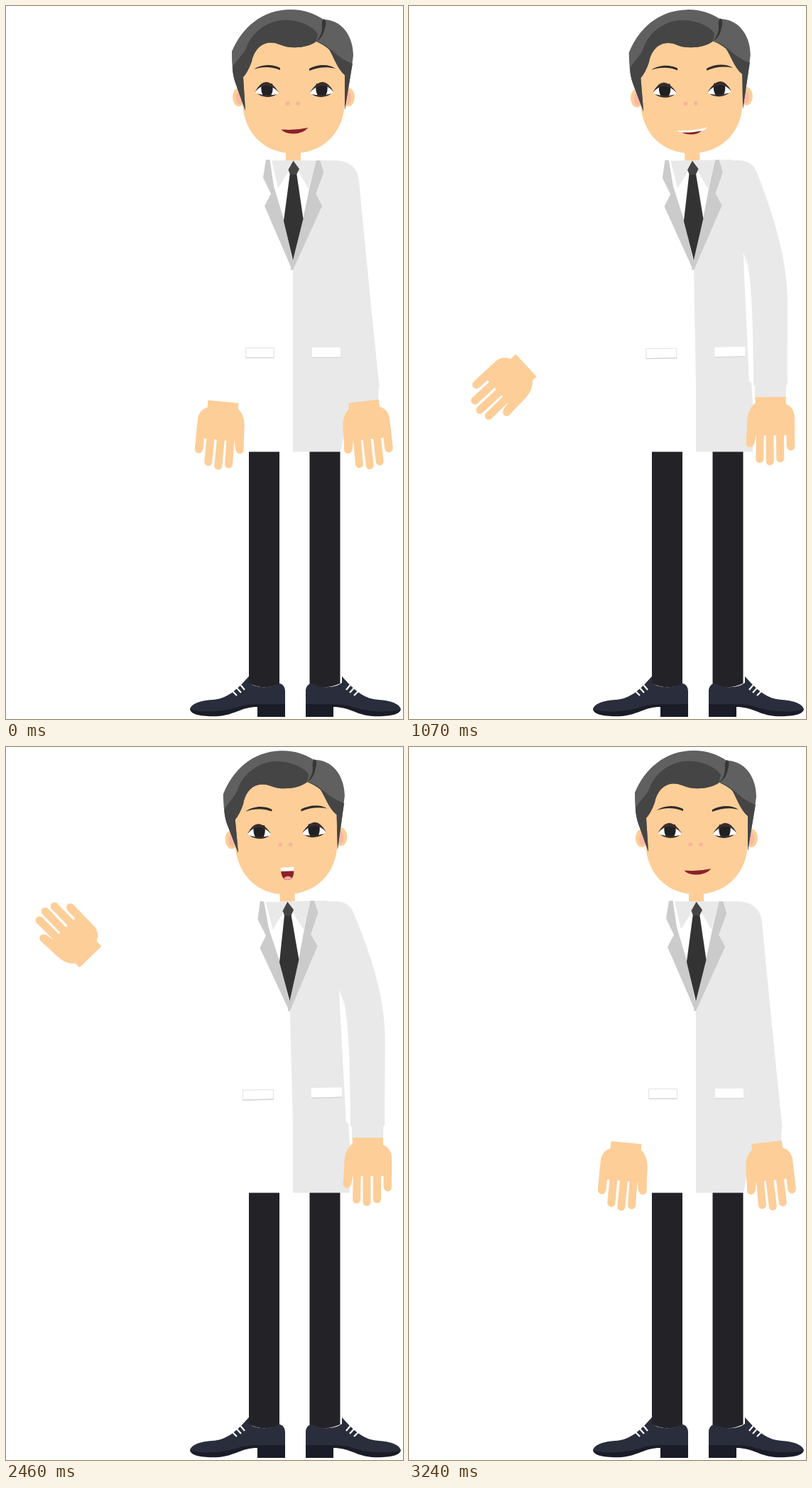
An HTML page for the animation above (3320 ms loop, 559x1002 px).

```html
<!DOCTYPE html>
<html lang="en">
<head>
<meta charset="utf-8">
<title>Doctor presenting</title>
<style>
  html, body { margin: 0; width: 100%; height: 100%; overflow: hidden; background: #fff; }
  svg { display: block; width: 100vw; height: 100vh; }
</style>
</head>
<body>
<svg viewBox="0 0 559 1002" preserveAspectRatio="none">
  <defs>
    <g id="shoe">
      <path fill="#1a1c27" d="M259 988C260 996 275 999 300 998C322 996 332 985 354 985V999H393V975H300Z"/>
      <path fill="#2a2d3b" d="M342 942C326 960 312 974 290 975C275 976 260 980 259 989C285 994 310 991 330 984C344 980 354 982 393 981V963C393 957 390 953 385 952C370 960 350 958 342 951Z"/>
      <path stroke="#fff" stroke-width="2.2" d="M316 960L325 969M321 954L331 965M326 949L336 961"/>
    </g>
    <g id="hand" fill="#fdce98" stroke="#fdce98">
      <path stroke="none" d="M-21.5 0H21.5V8C29 14 32 22 33 32L34.5 64L23.5 66L21 54H-22V70H-33.5V26C-32 17 -28 13 -21.5 10Z"/>
      <path stroke-width="11" stroke-linecap="round" d="M-28 36V70M-13 45V86.500M1.500 45V90.500M15 45L16 87M27 40L29.500 65"/>
    </g>
    <g id="eye">
      <path fill="#fff" d="M-16.500 4Q-2 -24 16.500 5Q10 10 0 10Q-10 10 -16.500 4Z"/>
      <path fill="#212124" d="M-7.500 -8H7.500C9 -2 8 6 5 9H-5C-8 6 -9 -2 -7.500 -8Z"/>
      <path fill="#3a2d2a" d="M-17 4Q-2 -25 17 5Q-1 -15 -17 4ZM-14 6Q0 10 14 7Q8 11 0 11Q-9 10 -14 6Z"/>
    </g>
  </defs>

  <path fill="#232227" d="M342 620H385V953Q364 962 342 952ZM427.500 620H470.500V952Q449 962 427.500 953Z"/>
  <use href="#shoe"/>
  <use href="#shoe" transform="matrix(-1 0 0 1 815 0)"/>

  <path fill="#fff" d="M330 525H404V626.500H330Z"/>
  <path id="skirt" fill="#e9e9e9"/>
  <path id="sleeve" fill="#e9e9e9"/>

  <g id="upper">
    <g fill="#fdce98">
      <path d="M394 195H415V219H394Z"/>
      <ellipse cx="328" cy="128" rx="9" ry="13"/>
      <ellipse cx="482" cy="128" rx="9" ry="13"/>
    </g>
    <ellipse cx="329" cy="129" rx="5" ry="9" fill="#f9b8a3"/>
    <ellipse cx="481" cy="129" rx="5" ry="9" fill="#f9b8a3"/>
    <path fill="#fdce98" d="M333 90C333 60 350 45 404 45C460 45 477 60 477 90V136C475 180 445 207 404 207C365 207 335 180 333 136Z"/>

    <path fill="#606060" d="M337 147L323 108C319 96 318 82 318 64C332 31 360 5 401 5C420 5 435 11 447 19C471 19 489 40 489 70L485 98L477 146V97C466 88 461 70 455 61Q447 54 437 50C425 59 400 61 385 54C365 46 350 58 346 78Q341 92 334 100Z"/>
    <g fill="#454545">
      <path d="M337 147L323 108Q319 97 319 86C325 75 335 68 339 57C346 38 366 22 388 20C410 18 432 28 439 39Q438 46 436 50C425 59 400 61 385 54C365 46 350 58 346 78Q341 92 334 100Z"/>
      <path d="M437 50C455 53 463 72 488 81L485 98L477 146V97C466 88 461 70 455 61Q447 54 437 50Z"/>
    </g>
    <path fill="#363636" d="M447 18Q453 20 449 31Q447 44 437 50Q446 39 445 29Q444 23 447 18Z"/>

    <path fill="#302b29" d="M349 89C359 82 374 81 386 87V90C374 85 361 85 349 89ZM427 88C439 82 454 81 464 88C452 85 439 86 427 91Z"/>
    <use href="#eye" x="367.500" y="117"/>
    <use href="#eye" transform="matrix(-1 0 0 1 444.500 117)"/>
    <circle cx="396.500" cy="137" r="2.700" fill="#f6b29d"/>
    <circle cx="411" cy="137" r="2.700" fill="#f6b29d"/>

    <path class="mouth" fill="#8a2229" d="M387.500 173.500Q408 175 425.500 171Q418 179.500 404 179.500Q392 179 387.500 173.500Z"/>
    <g class="mouth">
      <path fill="#fff" d="M384 174.500Q406 176 427 170.500Q420 178 406 179.500Q392 180 384 174.500Z"/>
      <path fill="#8a2229" d="M390 177.500Q406 178 419 175.500Q412 180.500 404 180.500Q395 180 390 177.500Z"/>
    </g>
    <g class="mouth">
      <path fill="#8a2229" d="M396.500 173H414.500C415 183 411 187 406 187C400 187 397 183 396.500 173Z"/>
      <path fill="#fff" d="M396 169.500L415 168.500L414.500 174.500H396.500Z"/>
      <path fill="#f7a7a0" d="M400 184Q406 179 411.500 184Q409 187 406 187Q402 187 400 184Z"/>
    </g>

    <path fill="#e9e9e9" d="M404 217H460L480 245L474 352L479 532H404Z"/>
    <path fill="#fff" d="M367 217H404V370H367Z"/>
    <path fill="#fff" d="M374 217H434L419 300L403 360L391 305L378 255Z"/>
    <path fill="#e9e9e9" d="M374 217H435L426 257L405 221L383 256Z"/>
    <path fill="#cbcbcb" d="M366 216H371.500L377 253L392 303L403 357L445 281L436 264L447 234L442 217H437L428 256L418 302L403 357V371L364 281L373 264L362 241Z"/>
    <path fill="#cbcbcb" d="M428 253L437 217H442L447 234L436 264L445 281L404 371H401L403 355L418 300Z"/>
    <path stroke="#fff" stroke-width="2" d="M373 217L379 253"/>
    <path fill="#333" d="M400 234H409L418.500 299L404 357L391 302Z"/>
    <path fill="#454545" d="M404.500 217.500L413 229L409 237H400L397.500 230Z"/>

    <path id="leftPocket" fill="#fff" stroke="#e2e2e2"/>
    <path id="rightPocket" fill="#fff"/>
    <path id="pocketShade" stroke="#d2d2d2" stroke-width="1.200"/>
  </g>

  <path id="gap" fill="#fff" d="M474.500 352C482 382 484.500 430 485 533H487V566L484 570V540C480 475 476 425 474.500 352Z"/>
  <path id="cuff" fill="#fff" d="M484 538H486V553L484 568Z"/>
  <use id="leftHand" href="#hand"/>
  <use id="rightHand" href="#hand"/>
</svg>

<script>
const LOOP = 3320, FRAMES = 81, STEP = LOOP / FRAMES;
const $ = id => document.getElementById(id);
const mouths = document.querySelectorAll('.mouth');

// Rows are [frame, ...values].
const LEFT_HAND = [
  [0, 306, 556, 5.5], [9, 304, 555, -1], [15, 303, 554, -3], [21, 303, 554, -3],
  [22, 296, 553, 1], [24, 248, 546, 18], [26, 165, 505, 47], [27, 128, 462, 64],
  [28, 108, 414, 81], [29, 101, 370, 98], [30, 104, 335, 114], [31, 113, 308, 128],
  [32, 122, 288, 139], [33, 129, 277, 145], [59, 129, 277, 145], [60, 119, 295, 136],
  [61, 106, 323, 124], [62, 104, 368, 110], [63, 111, 406, 95], [64, 123, 439, 79],
  [66, 178, 513, 46], [68, 248, 547, 18], [71, 296, 554, 1], [74, 304, 555, -1], [79, 306, 556, 5.5]
];
const LEAN = [[0, 0], [21, 0], [26, .64], [30, .94], [33, 1], [59, 1], [61, .88], [64, .5], [68, .12], [72, 0], [79, 0]];
const BEND = [[0, 0], [9, .6], [13, .72], [15, .75], [21, .75], [26, .93], [33, 1], [59, 1], [64, .93], [74, .6], [79, 0]];

const SLEEVE_STRAIGHT = 'M440 217L462 217C484 217 495 228 497 245C503 310 514 420 518 460C521 490 523 510 525.5 533L524.5 540L524 555L482 559L480 535L478 535C478 470 474 400 470 352Z';
const SLEEVE_BENT = 'M430 217L466 217C480 218 486 224 490 235C505 270 534 340 534 410C534 450 533 500 533.5 531L531.5 533L531 551L487 551L487 533L484 533C483 470 482 400 473 352Z';

const mix = (a, b, k) => a + (b - a) * k;
const clamp = v => Math.max(0, Math.min(1, v));

function at(keys, frame) {
  const i = keys.findIndex(row => row[0] > frame);
  if (i < 0) return keys[keys.length - 1].slice(1);
  const [a, b] = [keys[i - 1], keys[i]];
  const k = (frame - a[0]) / (b[0] - a[0]);
  return a.slice(1).map((v, n) => mix(v, b[n + 1], k));
}

function mixPath(a, b, k) {
  const ends = b.match(/[\d.]+/g);
  let n = 0;
  return a.replace(/[\d.]+/g, v => mix(+v, +ends[n++], k).toFixed(2));
}

function place(id, x, y, angle, flip = 1) {
  $(id).setAttribute('transform', `translate(${x} ${y}) rotate(${angle}) scale(${flip} 1)`);
}

function draw(frame) {
  const [lean] = at(LEAN, frame), [bend] = at(BEND, frame);
  const shape = (id, d) => $(id).setAttribute('d', d);

  $('upper').setAttribute('transform', `rotate(${-1.6 * lean} 404 530)`);
  place('leftHand', ...at(LEFT_HAND, frame));
  place('rightHand', mix(503.5, 509.5, bend), mix(555.5, 549, bend), -6.5 * (1 - bend), -1);

  shape('sleeve', mixPath(SLEEVE_STRAIGHT, SLEEVE_BENT, bend));
  const hem = mix(471, 484, clamp((bend - .6) / .3));
  shape('skirt', `M404 528H482L484 560L${hem} 626.500H404Z`);
  $('gap').setAttribute('opacity', clamp((bend - .75) / .12));
  $('cuff').setAttribute('opacity', clamp((bend - .3) / .2));

  const spread = 3 * clamp(bend / .6);
  const left = 337.5 - spread, right = 471 + spread;
  shape('leftPocket', `M${left} 480.500H377.500V494H${left}Z`);
  shape('rightPocket', `M431 480H${right}V493.500H431Z`);
  shape('pocketShade', `M${left} 494.500H378M431.500 494H${right}`);

  const talking = frame >= 23 && frame < 73;
  const mouth = talking ? ((frame + 1) % 4 < 2 ? 2 : 1) : 0;
  mouths.forEach((m, i) => m.setAttribute('visibility', i === mouth ? 'visible' : 'hidden'));
}

function tick() {
  draw(Math.floor((performance.now() % LOOP + 5) / STEP) % FRAMES);
  requestAnimationFrame(tick);
}
tick();
</script>
</body>
</html>
```
